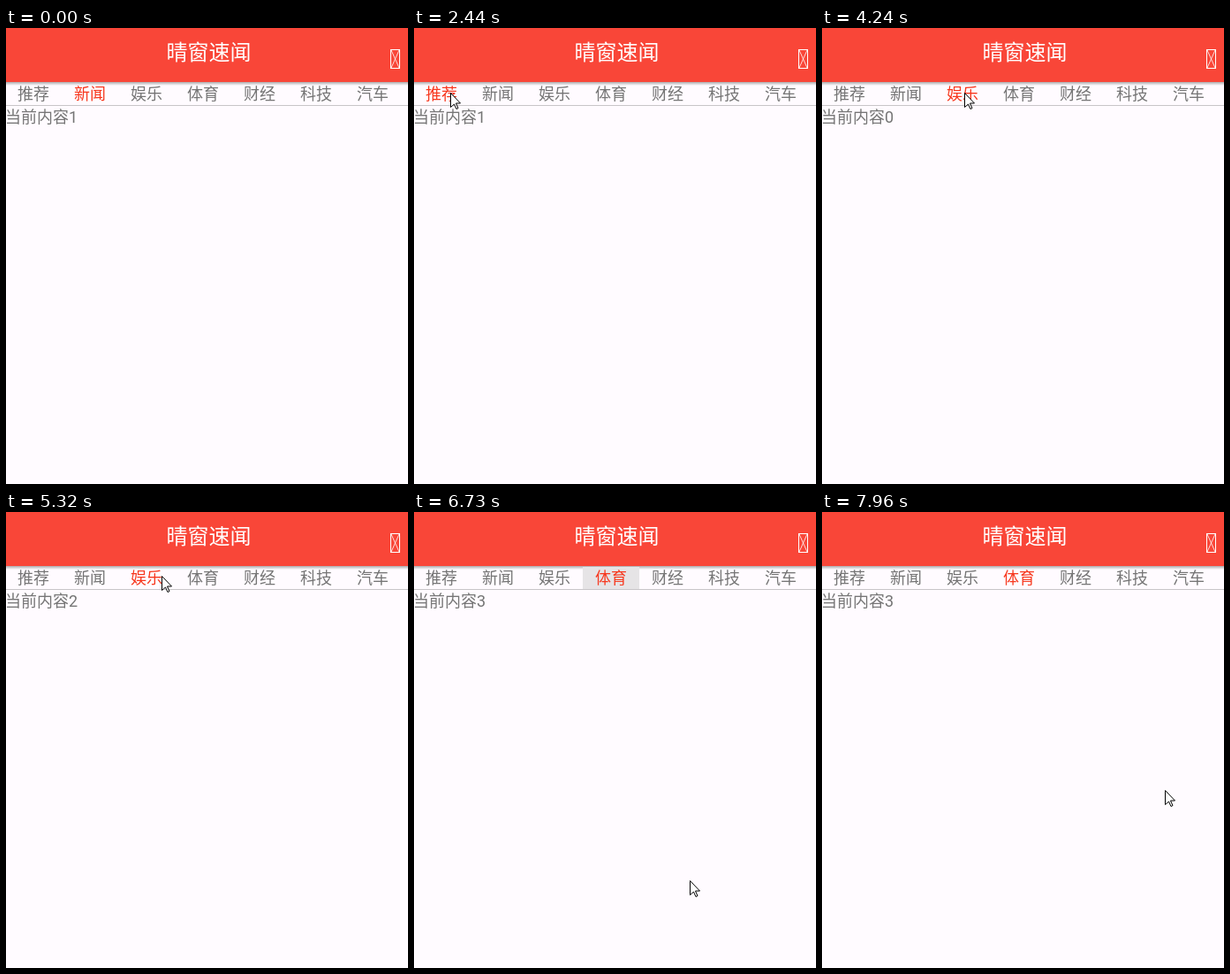
An HTML page with a canvas for the animation above (8000 ms loop, 455 by 515 pixels).

```html
<!DOCTYPE html>
<html lang="zh-CN">
<head>
<meta charset="utf-8">
<style>
html, body { margin: 0; width: 100%; height: 100%; overflow: hidden; background: #fffbff; }
canvas { display: block; }
</style>
</head>
<body>
<canvas id="stage" width="455" height="515"></canvas>
<script>
const ctx = document.getElementById('stage').getContext('2d');
const LOOP = 8000, TICK = 80;
const FONT = 'Roboto, "Noto Sans CJK SC", "Noto Sans CJK", sans-serif';
const RED = '#f94638', ACTIVE = '#f7371d', GREY = '#757575';
const TABS = ['推荐', '新闻', '娱乐', '体育', '财经', '科技', '汽车'];
const TAB_WIDTH = 64;

// The tab lights up at once; its content loads a little later
const taps = [
  { tab: 1, at: 0, loaded: 0 },
  { tab: 0, at: 2440, loaded: 2670 },
  { tab: 2, at: 4240, loaded: 4620 },
  { tab: 3, at: 6090, loaded: 6260 }
];
const pressed = { tab: 3, from: 6560, to: 6810 };

// Each move eases on from where the previous one ended
const entry = { x: 359, y: 480 };
const moves = [
  { from: 70, to: 790, x: 14, y: 65 },
  { from: 795, to: 1045, x: 40, y: 70 },
  { from: 1430, to: 1510, x: 41, y: 73 },
  { from: 2910, to: 3370, x: 165, y: 76 },
  { from: 3460, to: 3690, x: 161, y: 73 },
  { from: 5235, to: 5462, x: 213, y: 71 },
  { from: 6480, to: 6786, x: 326, y: 463 },
  { from: 6880, to: 7190, x: 110, y: 76 },
  { from: 7190, to: 7500, x: 35, y: 271 },
  { from: 7715, to: 7955, x: 388, y: 314 }
];

const lerp = (a, b, u) => a + (b - a) * u;
const smooth = u => u * u * (3 - 2 * u);
const latestTab = (t, key) => taps.filter(tap => t >= tap[key]).pop().tab;

function pointerAt(t) {
  let pos = entry;
  for (const { from, to, x, y } of moves) {
    if (t < from) break;
    const held = Math.floor((t - from) / TICK) * TICK;
    const u = smooth(Math.min(1, held / (to - from)));
    pos = { x: Math.round(lerp(pos.x, x, u)), y: Math.round(lerp(pos.y, y, u)) };
  }
  return pos;
}

function text(str, x, y, size, color, align = 'left') {
  ctx.font = `${size}px ${FONT}`;
  ctx.textAlign = align;
  ctx.fillStyle = color;
  ctx.fillText(str, x, y);
}

function rect(x, y, w, h, color) {
  ctx.fillStyle = color;
  ctx.fillRect(x, y, w, h);
}

function drawHeader() {
  const shadow = ctx.createLinearGradient(0, 61, 0, 65);
  shadow.addColorStop(0, 'rgba(0,0,0,.32)');
  shadow.addColorStop(1, 'rgba(0,0,0,0)');
  rect(0, 61, 455, 4, shadow);
  rect(0, 0, 455, 61, RED);
  text('晴窗速闻', 229.5, 36, 24, '#fff', 'center');

  // Missing-glyph box
  ctx.strokeStyle = '#fff';
  ctx.lineWidth = 1;
  ctx.strokeRect(435.5, 24.5, 10, 21);
  ctx.lineWidth = 0.8;
  ctx.stroke(new Path2D('M436 25 L445 45 M445 25 L436 45'));
}

function drawTabs(t) {
  if (t >= pressed.from && t < pressed.to)
    rect(pressed.tab * TAB_WIDTH - 1, 62, TAB_WIDTH, 25, '#e6e4e6');
  rect(0, 87, 455, 1, '#c8c5c8');
  const current = latestTab(t, 'at');
  TABS.forEach((name, i) =>
    text(name, 31 + TAB_WIDTH * i, 81, 18, i === current ? ACTIVE : GREY, 'center'));
}

const arrow = new Path2D('M0 0 V16 L4 12.5 L6.5 18 L8.5 17 L6 11.5 H11 Z');

function drawPointer({ x, y }) {
  ctx.save();
  ctx.translate(x + 0.5, y + 0.5);
  ctx.fillStyle = '#fff';
  ctx.fill(arrow);
  ctx.strokeStyle = '#000';
  ctx.lineWidth = 1;
  ctx.stroke(arrow);
  ctx.restore();
}

function draw(t) {
  rect(0, 0, 455, 515, '#fffbff');
  drawHeader();
  drawTabs(t);
  text('当前内容' + latestTab(t, 'loaded'), -1, 107, 18, GREY);
  if (t >= moves[0].from) drawPointer(pointerAt(t));
}

const began = performance.now();
function frame() {
  draw(Math.max(0, performance.now() - began) % LOOP);
  requestAnimationFrame(frame);
}
frame();
</script>
</body>
</html>
```
